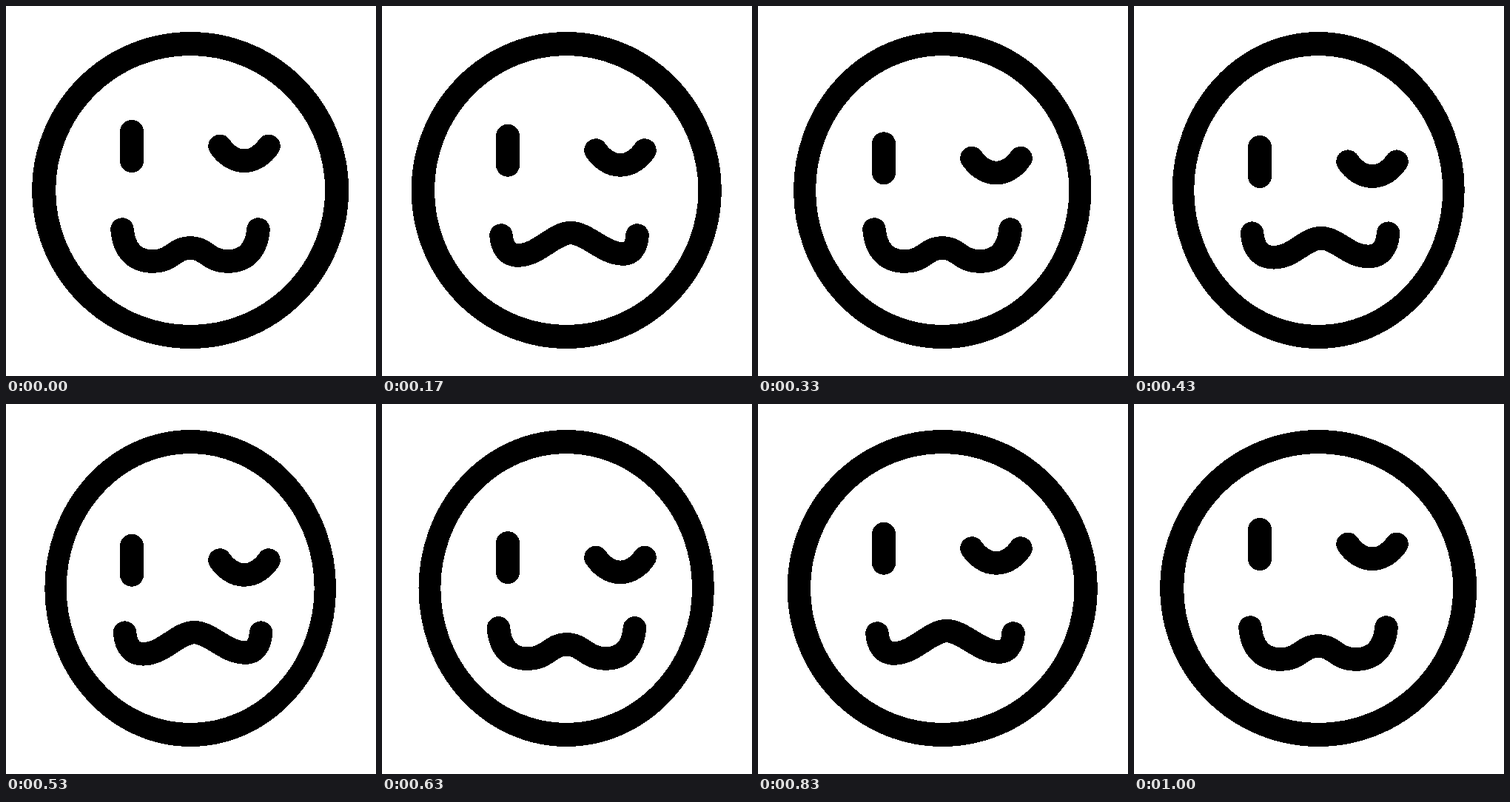
An HTML page for the animation above (1.16 s loop, 500 by 500 pixels).

```html
<!DOCTYPE html>
<html lang="en">
<head>
<meta charset="utf-8">
<title>Woozy wink</title>
<style>
  html, body { margin: 0; width: 100%; height: 100%; overflow: hidden; background: #fff; }
  svg { display: block; width: 100vw; height: 100vh; }
</style>
</head>
<body>
<svg viewBox="0 0 500 500" fill="none" stroke="#000" stroke-width="32" stroke-linecap="round" stroke-linejoin="round" shape-rendering="crispEdges">
  <circle id="face" r="198"/>
  <g id="eyes">
    <path d="M170 170V209"/>
    <path stroke-width="31.5" d="M289 189.3C296 200 308 209.3 322 209.3S348 200 355 189.3"/>
  </g>
  <path id="mouth" stroke-width="31.5"/>
</svg>
<script>
  const LOOP = 1160;
  const HALF = 15;  // steps from rest to the full squash
  const WOBBLE = 5; // steps from one mouth shape to the other

  const [face, eyes, mouth] = ['face', 'eyes', 'mouth'].map(id => document.getElementById(id));

  const ease = u => u * u * (3 - 2 * u);

  // Eased swing 0 -> 1 -> 0 that turns around every `span` steps.
  const swing = (step, span) => ease(1 - Math.abs(1 - (step / span) % 2));

  // 30 steps per second, on a 10 ms clock, then a rest.
  const stepAt = ms => Math.min(2 * HALF, Math.floor((Math.floor(ms / 10) + 0.5) * 0.3));

  // Each key point rests at (x, y) and drifts by (dx, dy) at full wobble.
  function mouthPath(wobble) {
    const key = (x, y, dx, dy) => ({ x: x + dx * wobble, y: y + dy * wobble });
    const left = key(157, 302, 4, 8);
    const leftDip = key(198, 345, -14, -8);
    const hill = key(249, 327, 6, -20.5);
    const rightDip = key(300, 345, 26, -10);
    const right = key(341, 302, 4, 8);

    const at = p => `${p.x} ${p.y}`;
    const beside = (p, dx) => `${p.x + dx} ${p.y}`;
    const below = (end, dip) => `${end.x + 0.06 * (dip.x - end.x)} ${end.y + 0.64 * (dip.y - end.y)}`;
    const toward = (dip, end) => beside(dip, 0.6 * (end.x - dip.x));

    return `M${at(left)}
      C${below(left, leftDip)} ${toward(leftDip, left)} ${at(leftDip)}
      C${beside(leftDip, 27)} ${beside(hill, -22)} ${at(hill)}
      C${beside(hill, 22)} ${beside(rightDip, -27)} ${at(rightDip)}
      C${toward(rightDip, right)} ${below(right, rightDip)} ${at(right)}`;
  }

  function draw(ms) {
    const step = stepAt(ms % LOOP);
    const squash = swing(step, HALF);

    face.setAttribute('transform', `translate(249.2 249) scale(${1 - 0.081 * squash} 1)`);
    eyes.setAttribute('transform', `translate(0 ${22 * squash})`);
    mouth.setAttribute('d', mouthPath(swing(step, WOBBLE)));
  }

  const start = performance.now();
  function tick() {
    draw(performance.now() - start);
    requestAnimationFrame(tick);
  }
  tick();
</script>
</body>
</html>
```
